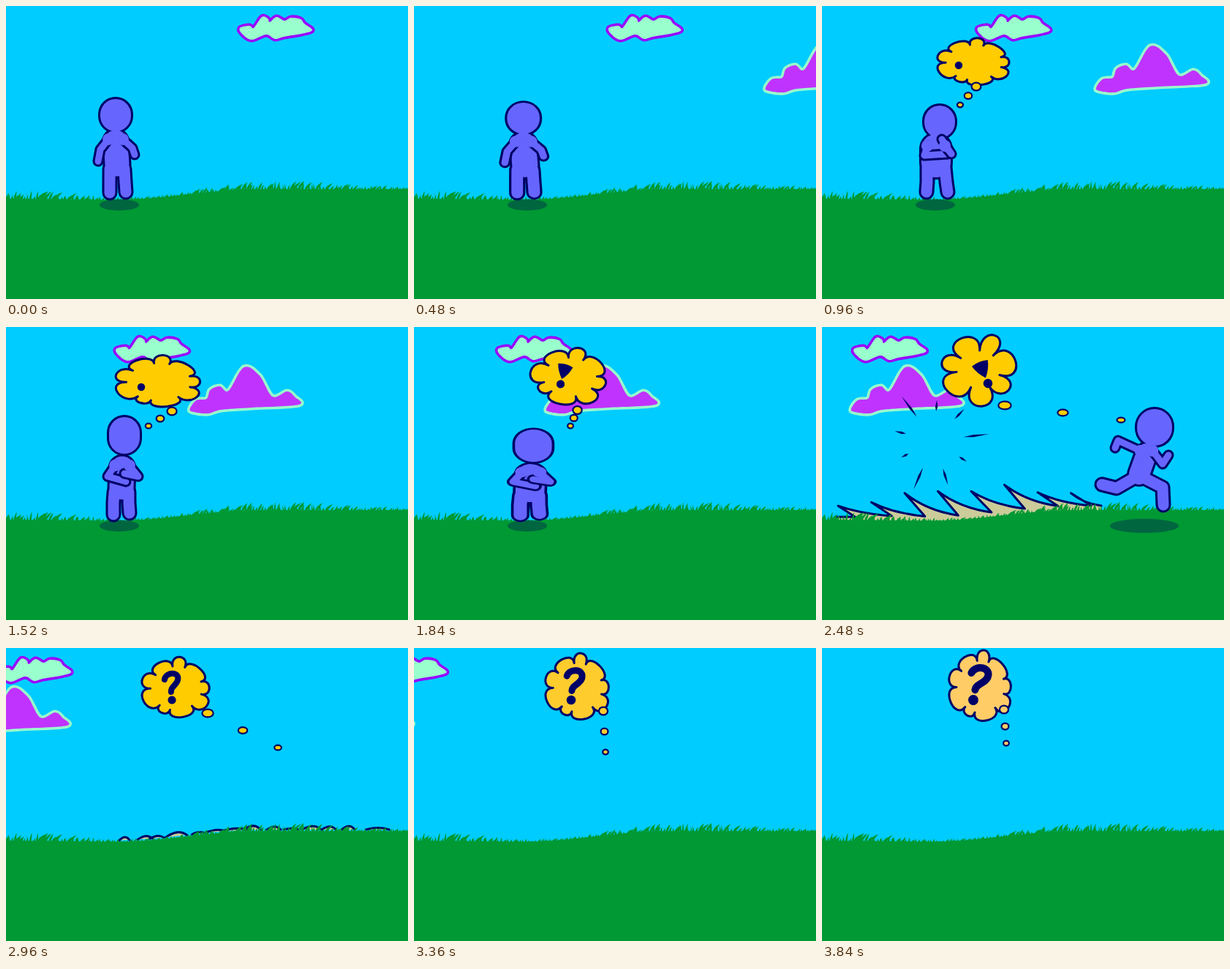
An HTML page for the animation above (3.92 s loop, 550x400 px).

```html
<!DOCTYPE html>
<html lang="en">
<head>
<meta charset="utf-8">
<title>A sudden thought</title>
<style>
  html, body { margin: 0; width: 100%; height: 100%; overflow: hidden; background: #00ccff; }
  svg { display: block; width: 550px; height: 400px; }
  path { stroke-linecap: round; stroke-linejoin: round; }
  .ink { stroke: #000066; stroke-width: 3; }
  .dark { fill: #000066; }
  .sand { fill: #cccc99; }
  .green { fill: #009933; }
  .none { fill: none; }
  .cloud { paint-order: stroke; stroke-width: 7; }
</style>
</head>
<body>
<svg viewBox="0 0 550 400">
  <path id="wisp" class="cloud" fill="#99ffcc" stroke="#9900ff"/>
  <path id="hill" class="cloud" fill="#c033ff" stroke="#99ffcc"/>
  <path id="dustFill" class="sand"/>
  <path id="dust" class="ink none"/>
  <path id="ground" class="green"/>
  <path id="grass" class="green"/>
  <path id="burst" class="dark"/>
  <g id="thought">
    <path id="bubble" class="ink"/>
    <path id="tail" class="ink" style="stroke-width: 2.2"/>
    <g id="mark">
      <circle r="7" class="dark"/>
      <path id="wedge" class="dark" d="M-13 -33Q0 -37 13 -33Q10 -20 0 -9Q-10 -20 -13 -33Z"/>
      <path id="hook" class="ink none" style="stroke-width: 10" d="M-9 -36C-5 -49 17 -48 14 -34C11 -24 0 -23 0 -14"/>
    </g>
  </g>
  <path id="shadow" fill="#006640"/>
  <g id="figure"></g>
</svg>
<script>
const STEP = 80, LOOP = 3920, TAU = Math.PI * 2;
const $ = id => document.getElementById(id);
const setD = (id, d) => $(id).setAttribute('d', d);
const place = (id, transform) => $(id).setAttribute('transform', transform);
const show = (id, on) => $(id).style.display = on ? '' : 'none';
const clamp = v => Math.max(0, Math.min(1, v));
const span = (t, a, b) => clamp((t - a) / (b - a));
const hump = (t, a, b) => Math.sin(Math.PI * span(t, a, b));

function randomizer(seed) {
  return () => (seed = seed * 16807 % 2147483647) / 2147483647;
}

// Blend numbers, or lists and records of numbers
function mix(a, b, k) {
  if (typeof a === 'number') return a + (b - a) * k;
  if (Array.isArray(a)) return a.map((v, i) => mix(v, b[i], k));
  return Object.fromEntries(Object.keys(a).map(n => [n, mix(a[n], b[n], k)]));
}

// Value of a keyed track [[time, value], ...] at time t
function sample(keys, t) {
  const i = keys.findIndex(k => k[0] > t);
  if (i < 0) return keys[keys.length - 1][1];
  if (i === 0) return keys[0][1];
  const [t0, a] = keys[i - 1], [t1, b] = keys[i];
  return mix(a, b, span(t, t0, t1));
}

// Smooth closed curve through a flat point list
function blob(p) {
  const n = p.length / 2;
  const at = i => [p[(i + n) % n * 2], p[(i + n) % n * 2 + 1]];
  let d = 'M' + at(0);
  for (let i = 0; i < n; i++) {
    const [a, b, c, e] = [at(i - 1), at(i), at(i + 1), at(i + 2)];
    d += `C${b.map((v, k) => v + (c[k] - a[k]) / 6)} ${c.map((v, k) => v - (e[k] - b[k]) / 6)} ${c}`;
  }
  return d + 'Z';
}

const ellipse = (x, y, rx, ry) =>
  `M${x - rx} ${y}a${rx} ${ry} 0 1 1 ${rx * 2} 0a${rx} ${ry} 0 1 1 ${-rx * 2} 0Z`;

/* Scenery */

const horizon = x => {
  const k = span(x, 150, 345);
  return 263 + Math.min(1.5, x / 100) - 14.5 * k * k * (3 - 2 * k);
};

function drawScenery() {
  const rnd = randomizer(11);
  let top = 'M0 400', blades = '';
  for (let x = 0; x <= 550; x += 10) top += `L${x} ${horizon(x)}`;
  setD('ground', top + 'V400Z');
  for (let x = -5; x < 552; x += 1.5 + rnd() * 3.5) {
    const h = (9 + 4 * Math.cos(x / 60)) * (.35 + .65 * rnd());
    const lean = h * (rnd() * 1.3 - .2), y = horizon(x) + 1;
    blades += `M${x - 1} ${y}Q${x} ${y - h * .6} ${x + lean} ${y - h}Q${x + 1.5 + lean * .5} ${y - h * .5} ${x + 2} ${y}Z`;
  }
  setD('grass', blades);
  setD('wisp', blob([320,30, 333,27, 339,30, 350,15, 358,17, 361,22, 370,15, 381,20, 390,16,
    403,18, 408,24, 419,33, 404,38, 380,42, 368,45, 356,39, 336,46, 323,38]));
  setD('hill', blob([375,112, 384,100, 398,98, 403,86, 416,81, 428,87, 449,55, 470,66, 488,95,
    508,88, 518,95, 524,106, 460,110, 418,113, 400,118, 380,116]));
}

/* Figure: a jointed doll. Head is x, y, radius, stretch; torso is neck, hip, width;
   limbs are middle joint and end; shadow is x and radius. */

const stand = {
  head: [150, 149, 21, 1], torso: [150, 186, 152, 216, 33], shadow: [155, 27],
  legs: [[142, 240, 142, 255], [163, 240, 164, 254]],
  arms: [[129, 196, 126, 212], [173, 194, 176, 203]]
};
const ponder = {
  head: [161, 158, 21, 1], torso: [156, 195, 156, 214, 40], shadow: [155, 27],
  legs: [[144, 240, 143, 254], [170, 240, 172, 254]],
  arms: [[140, 204, 172, 202], [177, 202, 164, 182]]
};
const fold = {
  head: [162, 148, 21, 4], torso: [159, 193, 158, 219, 33], shadow: [155, 27],
  legs: [[147, 240, 147, 256], [168, 240, 169, 254]],
  arms: [[139, 204, 164, 211], [181, 204, 162, 200]]
};
const dash = {
  head: [252, 147, 23, 0], torso: [249, 185, 249, 211, 34], shadow: [250, 28],
  legs: [[235, 240, 219, 243], [275, 232, 264, 249]],
  arms: [[222, 184, 228, 197], [277, 187, 276, 193]]
};
const sprint = {
  head: [455, 137, 24, 1], torso: [444, 173, 434, 201, 28], shadow: [441, 47],
  legs: [[403, 220, 383, 215], [466, 219, 467, 243]],
  arms: [[405, 155, 401, 165], [466, 187, 474, 175]]
};
const poses = [[560, stand], [800, ponder], [960, ponder], [1360, fold], [2000, fold], [2160, dash], [2480, sprint]];

const line = (points, width, color) =>
  `<path class="none" d="M${points}" stroke="${color}" stroke-width="${width}"/>`;
// Parts of one layer share a single outline
const layer = parts =>
  parts.map(([p, w]) => line(p, w + 6, '#000066')).join('') +
  parts.map(([p, w]) => line(p, w, '#6666ff')).join('');

function drawFigure(t) {
  show('figure', t < 2800);
  show('shadow', t < 2800);
  const { head, torso, shadow, legs, arms } = sample(poses, t);
  const [hx, hy, r, stretch] = head, [nx, ny, px, py, w] = torso;
  const side = i => (i * 2 - 1) * w * .3;
  const skull = [[hx, hy - stretch, hx, hy + stretch + .1], r * 2];
  const trunk = [[nx, ny, px, py], w];
  const limbs = legs.map((p, i) => [[px + side(i), py + 6, ...p], 15]);
  let art = layer([skull, trunk, ...limbs]);
  arms.forEach((p, i) => {
    const shoulder = [nx + side(i), ny - 4];
    art += layer([[[...shoulder, ...p], 9]]) + line([...shoulder, ...shoulder], 16, '#6666ff');
  });
  $('figure').innerHTML = art;

  const run = Math.max(0, t - 2480) * .593;
  const squat = hump(t, 0, 560) * .14 + hump(t, 1680, 2000) * .2;
  place('figure', `translate(${155 + run} 265) scale(${1 + squat} ${1 - squat * .6}) translate(-155 -265)`);
  setD('shadow', ellipse(shadow[0] + run, 271.5, shadow[1], 5 + shadow[1] * .1));
}

/* Thought: bubble box (centre, radii), lobe count and depth, both ends of the tail,
   and the mark's dot, tilt and size */

const thoughts = [
  [960, { box: [208, 77, 51, 32], lobes: 9, depth: .24, tail: [211, 110, 189, 135], mark: [187, 81, 0, .75] }],
  [1520, { box: [209, 75, 60, 35], lobes: 9, depth: .26, tail: [227, 115, 195, 135], mark: [185, 82, 0, .75] }],
  [2160, { box: [218, 62, 47, 43], lobes: 7, depth: .36, tail: [220, 112, 233, 135], mark: [216, 74, 30, .85] }],
  [2480, { box: [214, 58, 56, 48], lobes: 7, depth: .46, tail: [250, 107, 409, 127], mark: [227, 77, -22, .9] }],
  [2960, { box: [233, 55, 48, 41], lobes: 9, depth: .26, tail: [276, 89, 372, 136], mark: [227, 71, -6, .8] }],
  [3360, { box: [224, 54, 45, 45], lobes: 9, depth: .25, tail: [259, 86, 262, 142], mark: [215, 71, 4, .9] }],
  [3840, { box: [217, 53, 44, 48], lobes: 9, depth: .25, tail: [249, 84, 252, 130], mark: [207, 71, 10, 1] }]
];

// Cloud outline with uneven lobes that reach the edge of the box
function lobed([cx, cy, rx, ry], count, depth) {
  const n = Math.round(count);
  const angle = i => -2.5 + TAU * i / n + .13 * Math.sin(i % n * 2.4);
  const at = (a, r) => `${cx + rx * r * Math.cos(a)} ${cy + ry * r * Math.sin(a)}`;
  const inner = 1 - depth;
  let d = 'M' + at(angle(0), inner);
  for (let i = 0; i < n; i++) {
    const a = angle(i), b = angle(i + 1), c = Math.cos((b - a) / 2);
    const peak = .98 + .07 * Math.sin(i * 1.9);
    const reach = (peak - .25 * inner * c) / (.75 * c);
    d += `C${at(a, reach)} ${at(b, reach)} ${at(b, inner)}`;
  }
  return d + 'Z';
}

function drawThought(t) {
  show('thought', t >= 640);
  const { box, lobes, depth, tail, mark } = sample(thoughts, t);
  const [ax, ay, bx, by] = tail, [mx, my, tilt, size] = mark;
  const grow = .4 + .6 * span(t, 800, 960);
  const paint = `rgb(${mix([255, 204, 0], [255, 204, 102], span(t, 2960, 3840))})`;
  $('bubble').setAttribute('fill', paint);
  $('tail').setAttribute('fill', paint);
  setD('bubble', t < 800 ? '' : lobed(mix([210, 100, 0, 0], box, grow), lobes, depth));

  let dots = '';
  for (let i = 0; i < 3; i++) {
    if (t < 800 - i * 80) continue;
    const r = 6 - i * 1.1;
    dots += ellipse(mix(ax, bx, i / 2), mix(ay, by, i / 2), r * (1 + Math.abs(bx - ax) / 350), r * .9);
  }
  setD('tail', dots);

  show('mark', t >= 960);
  place('mark', `translate(${mx} ${my}) rotate(${tilt}) scale(${size})`);
  show('wedge', t >= 1760 && t < 2720);
  show('hook', t >= 2720);
}

/* Burst: tapered rays around the place the figure left */

function drawBurst(t) {
  show('burst', t >= 2080 && t < 2720);
  const reach = sample([[2080, 62], [2160, 82], [2480, 63], [2720, 42]], t);
  let d = '';
  for (let i = 0; i < 9; i++) {
    const a = -2.91 + i * TAU / 9;
    const far = reach * (1 + .2 * Math.sin(i * 2.2 - .6)), near = 40;
    const at = (r, off) => `${154 + r * Math.cos(a) - off * Math.sin(a)} ${155 + r * Math.sin(a) + off * Math.cos(a)}`;
    const mid = mix(near, far, .4);
    d += `M${at(near, 0)}L${at(mid, 1.7)}L${at(far, 0)}L${at(mid, -1.7)}Z`;
  }
  setD('burst', d);
}

/* Dust: back-swept crests while running, low crumbs afterwards */

function crests(left, right, height) {
  const n = 8, gap = (right - left) / n;
  let d = `M${left} ${horizon(left) - 4}h${gap * .6}`;
  for (let i = 0; i < n; i++) {
    const x = left + i * gap, end = Math.min(right, x + gap * 1.7);
    const h = height * (.25 + .75 * Math.sin(Math.PI * (i + .3) / n)) * (1 + .15 * Math.cos(i * 2.6));
    const tip = horizon(x) - 5 - h, low = horizon(end) - 6;
    d += `L${x + 4} ${tip}Q${mix(x, end, .45)} ${mix(tip, low, .8)} ${end} ${low}`;
  }
  return d;
}

function crumbs(k) {
  const rnd = randomizer(5);
  let d = '';
  for (let x = 155; x < 535;) {
    const w = 14 + rnd() * 22, h = (3 + rnd() * 8) * k;
    d += `M${x} ${horizon(x) - 2}Q${x + w * .6} ${horizon(x + w / 2) - 2 - h} ${x + w} ${horizon(x + w) - 2}`;
    x += w + rnd() * 22 - 6;
  }
  return d;
}

function drawDust(t) {
  let d = '', base = '';
  if (t >= 2720 && t < 3360) {
    d = crumbs(span(t, 3440, 2960));
  } else if (t >= 2080 && t < 2720) {
    const left = mix(54, 18, span(t, 2160, 2480)), right = 217 + (t - 2160) * .516;
    d = crests(left, right, sample([[2080, 16], [2160, 25], [2480, 36], [2720, 8]], t));
    base = `V275H${left}Z`;
  }
  setD('dust', d);
  setD('dustFill', d && d + base);
}

function draw(t) {
  place('wisp', `translate(${-.1114 * t})`);
  place('hill', `translate(${.2205 * (960 - t)})`);
  drawDust(t);
  drawBurst(t);
  drawThought(t);
  drawFigure(t);
}

drawScenery();
const start = performance.now();
let shown = -1;
function tick() {
  const t = Math.floor((performance.now() - start) % LOOP / STEP) * STEP;
  if (t !== shown) draw(shown = t);
  requestAnimationFrame(tick);
}
tick();
</script>
</body>
</html>
```
